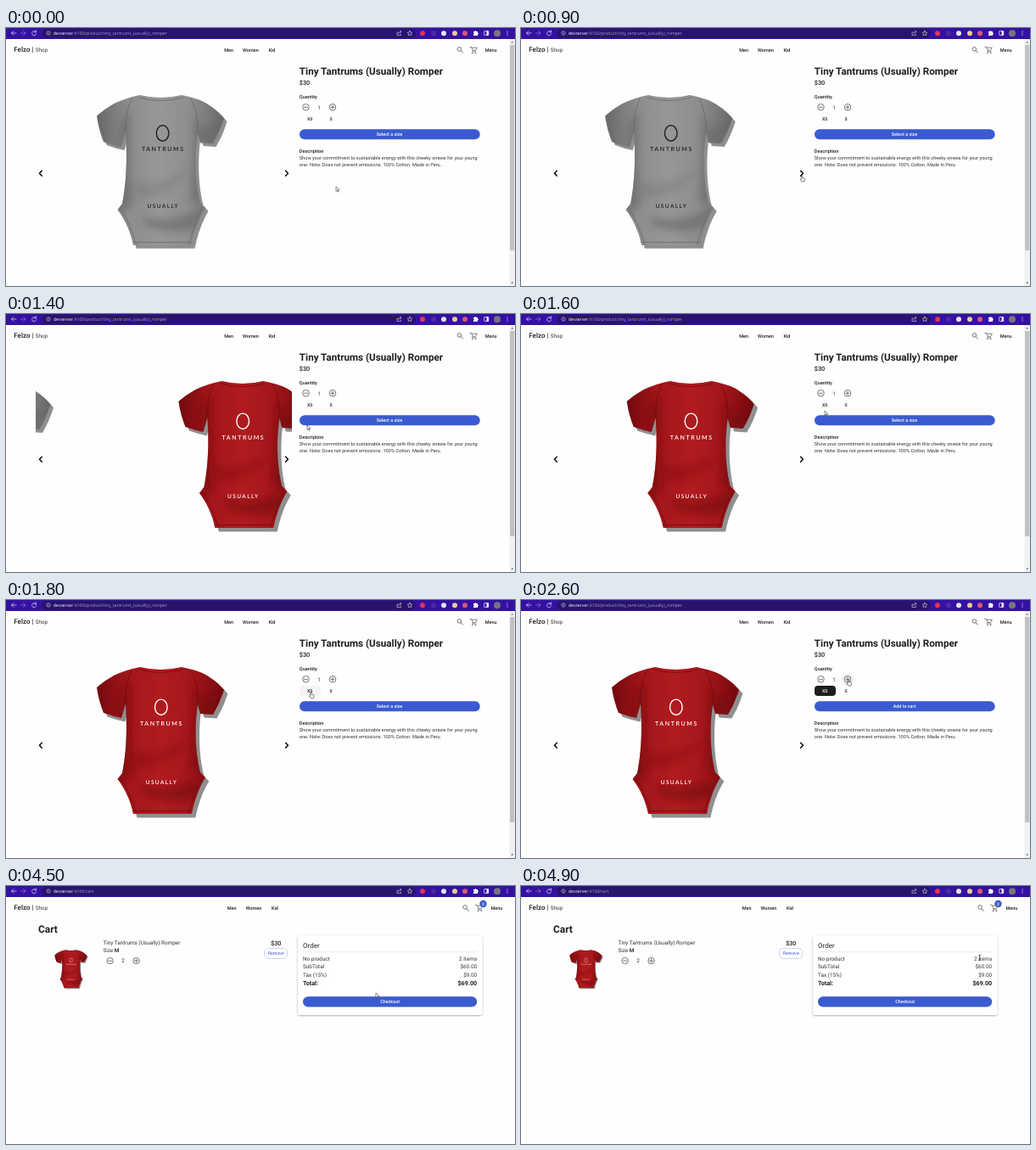
Write an HTML page that moves like this. It is 600 by 304 pixels and loops after 5 s.

```html
<!DOCTYPE html>
<html lang="en">
<head>
<meta charset="utf-8">
<title>Shop</title>
<style>
html, body { margin: 0; width: 100%; height: 100%; overflow: hidden; background: #fff; }
svg { display: block; width: 600px; height: 304px; font-family: Roboto, Arial, sans-serif; text-rendering: geometricPrecision; }
.url { font-family: "Open Sans", "Noto Sans", sans-serif; }
.print { font-family: Lato, Roboto, sans-serif; }
.line { fill: none; stroke-linecap: round; stroke-linejoin: round; }
</style>
</head>
<body>
<svg id="stage" viewBox="0 0 600 304"></svg>
<script>
const LOOP = 5000, STEP = 100;
const BLUE = '#3a5bd0', INK = '#1d1e20', GREY = '#555';
const NAME = 'Tiny Tantrums (Usually) Romper';
const HOST = 'devserver';

const text = (x, y, s, size = 5.6, o = {}) =>
  `<text x="${x}" y="${y}" font-size="${size}" font-weight="${o.w || 400}" fill="${o.fill || INK}"
    text-anchor="${o.at || 'start'}" class="${o.cls || ''}" letter-spacing="${o.ls || 0}"
    ${o.id ? `id="${o.id}"` : ''}>${s}</text>`;
const rect = (x, y, w, h, r, fill, more = '') =>
  `<rect x="${x}" y="${y}" width="${w}" height="${h}" rx="${r}" fill="${fill}" ${more}/>`;
const dot = (x, y, r, fill, more = '') =>
  `<circle cx="${x}" cy="${y}" r="${r}" fill="${fill}" ${more}/>`;
const line = (d, stroke, width = 0.7) =>
  `<path class="line" d="${d}" stroke="${stroke}" stroke-width="${width}"/>`;

// Round minus or plus button with its hover disc
const stepper = (x, y, r, plus, id) =>
  (id ? dot(x, y, 7.6, '#f1f1f1', `id="${id}"`) : '') +
  dot(x, y, r, 'none', 'stroke="#555" stroke-width=".8"') +
  line(`M${x - 2} ${y}h4` + (plus ? `M${x} ${y - 2}v4` : ''), GREY, 0.8);

const BODY = `M158 79Q182 85 207 79C222 82 234 86 240 91Q251 98 257 106Q252 122 244 135L229 134L226 123
  C222 150 223 180 229 203L235 209C227 222 222 237 219 252L150 252C147 237 140 222 131.5 211
  L137 204C142 180 143 150 141 122L136 139Q126 137 115 133Q109 118 107 103Q116 95 127 89Q142 82 158 79Z`;

function garment(id, c, o) {
  return `<linearGradient id="${id}Fill"><stop offset="0" stop-color="${c.dark}"/>
    <stop offset=".25" stop-color="${c.mid}"/><stop offset=".5" stop-color="${c.light}"/>
    <stop offset=".75" stop-color="${c.mid}"/><stop offset="1" stop-color="${c.dark}"/></linearGradient>
  <g id="${id}">
    <g transform="translate(0 ${79 * (1 - o.stretch)}) scale(1 ${o.stretch})">
      <path d="${BODY}" fill="#555" opacity=".65" transform="translate(${o.drop} ${o.drop})" filter="url(#soft)"/>
      <path d="${BODY}" fill="url(#${id}Fill)"/>
      <g clip-path="url(#bodyClip)">
        <g filter="url(#fold)" fill="${c.dark}" opacity=".6">
          <path d="M134 112L147 95L146 160L149 208L132 212Z"/>
          <path d="M230 118L221 98L221 150L217 203L232 203Z"/>
          <path d="M150 178Q178 188 218 163Q190 200 152 197Z" opacity=".45"/>
          <path d="M160 219Q198 229 234 206L225 232Q196 240 165 230Z"/>
          <path d="M232 116L252 110L243 137L228 136Z"/>
        </g>
        ${line('M157 82Q182 89 208 82M110.5 101Q112 118 118.5 132M253 104Q249 120 240.5 134', c.dark, 0.8)}
        ${line('M135 209Q147 228 153.5 251M231 209Q221 230 215.5 251M149 248.5H220', c.dark, 0.8)}
        ${line('M148 83Q140 100 141 122M218 83Q227 100 226 123', c.dark, 0.8)}
      </g>
    </g>
    <ellipse cx="${o.cx - 0.7}" cy="${o.zero}" rx="7.3" ry="9.2" fill="none" stroke="${c.print}" stroke-width="1.4"/>
    ${text(o.cx, o.top, 'TANTRUMS', 7, { w: 600, fill: c.print, at: 'middle', ls: 1.6, cls: 'print' })}
    ${text(o.cx, o.low, 'USUALLY', 6.5, { w: 600, fill: c.print, at: 'middle', ls: 1.4, cls: 'print' })}
  </g>`;
}

const grey = { dark: '#686868', mid: '#8d8d8d', light: '#979797', print: '#1f1f1f' };
const red = { dark: '#74090e', mid: '#a3161a', light: '#b01b1f', print: '#fff' };
const defs = `<defs>
  <filter id="soft" x="-10%" y="-10%" width="120%" height="120%"><feGaussianBlur stdDeviation=".7"/></filter>
  <filter id="fold" x="-20%" y="-20%" width="140%" height="140%"><feGaussianBlur stdDeviation="4"/></filter>
  <filter id="lift" x="-5%" y="-10%" width="110%" height="125%">
    <feDropShadow dx="0" dy=".8" stdDeviation="1.1" flood-color="#000" flood-opacity=".35"/></filter>
  <clipPath id="bodyClip"><path d="${BODY}"/></clipPath>
  <clipPath id="slideClip"><rect x="35" y="40" width="302" height="262"/></clipPath>
  ${garment('grey', grey, { zero: 124, top: 144.7, low: 212.2, cx: 185.3, stretch: 1.023, drop: 3.6 })}
  ${garment('red', red, { zero: 126.3, top: 148, low: 217, cx: 183.5, stretch: 1, drop: 4.4 })}
</defs>`;

const browser = () => {
  const tools = [[491, '#e0364a'], [504, '#4b2aa6'], [516, '#dfe9e0'], [529, '#e6cd90'], [541, '#d75a70']];
  return rect(0, 0, 600, 13, 0, '#3511a3') + rect(42, 0.8, 441, 11, 5.5, '#28146c') +
    line('M12 6H6.5M8.9 3.6L6.5 6L8.9 8.4', '#e8e4f2') +
    line('M17.5 6H23M20.6 3.6L23 6L20.6 8.4', '#8f80c5') +
    line('M35.2 4.6A2.6 2.6 0 1 0 35.7 6.8M35.5 2.9V4.9H33.5', '#e8e4f2') +
    dot(50, 6, 2.2, 'none', 'stroke="#cfc8e2" stroke-width=".6"') + line('M50 5.8V7.1M50 4.7v.05', '#cfc8e2', 0.6) +
    `<text class="url" x="56" y="8" font-size="5.1" fill="#aca1c9"><tspan fill="#fff">${HOST}</tspan><tspan id="path"></tspan></text>` +
    line('M462 5H461V8.5H465.5V7M462.5 6.5Q463 4.4 465.8 4.3M464.6 3L466 4.3L464.6 5.6', '#ddd6ec', 0.6) +
    line('M476 3.2l.9 1.9 2 .2-1.5 1.4.4 2-1.8-1-1.8 1 .4-2-1.5-1.4 2-.2z', '#ddd6ec', 0.6) +
    tools.map(([x, c]) => dot(x, 6.2, 3, c)).join('') +
    `<path d="M551 4H552.6Q553.4 1.8 554.3 4H556V5.6Q558 6.4 556 7.4V9H551V7.4Q552.6 6.5 551 5.6Z" fill="#fff"/>` +
    rect(563.7, 3.5, 5, 5, 0.6, 'none', 'stroke="#fff" stroke-width=".7"') + rect(566.5, 3.5, 2.2, 5, 0.3, '#fff') +
    dot(579, 6.2, 4, '#77757c') + [4, 6, 8].map(y => dot(591, y, 0.6, '#fff')).join('');
};

const header = () =>
  text(9.3, 28.4, 'Felzo', 8, { w: 500 }) + text(30.6, 28.2, '|', 8) + text(34.8, 28.2, 'Shop', 6.3, { fill: '#333' }) +
  `<g id="nav">` + [[257.3, 'Men'], [279, 'Women'], [309.5, 'Kid']].map(([x, s]) => text(x, 27.8, s, 5.5, { w: 500 })).join('') + `</g>
  <g id="tools">` +
  dot(534.4, 24.9, 2.3, 'none', 'stroke="#666" stroke-width=".9"') + line('M536.2 26.8L538.6 29.2', '#666', 1) +
  line('M546.8 22.3H548.4L550.4 26.4H553.6L555.3 23.2H548.9M550.4 26.4L549.5 28H554.3', '#666', 0.8) +
  dot(549.8, 29.4, 0.75, '#666') + dot(553.7, 29.4, 0.75, '#666') +
  text(564.8, 27.8, 'Menu', 5.5, { w: 500 }) + `</g>`;

const product = () => `<g id="product">
  <g clip-path="url(#slideClip)"><g id="track"><use href="#grey"/><use href="#red" x="301"/></g></g>` +
  line('M42.3 168.3L39.4 171.3L42.3 174.3', '#000', 1.4) + line('M329.6 168.3L332.5 171.3L329.6 174.3', '#000', 1.4) +
  text(345.8, 55.3, NAME, 11.7, { w: 600 }) + text(345.8, 67, '$30', 7.3, { w: 500 }) +
  text(345.8, 82.6, 'Quantity', 5.6, { w: 500 }) +
  stepper(353.5, 93.3, 3.8, false, 'hotMinus') + stepper(385, 93.3, 3.8, true, 'hotPlus') +
  text(369, 95.5, '1', 6.3, { at: 'middle', id: 'qty', fill: '#333' }) +
  rect(346, 101, 25, 12, 4, '#f4f4f4', 'id="chip"') +
  text(358.3, 109, 'XS', 5.2, { w: 500, at: 'middle', id: 'xs' }) + text(383, 109, 'S', 5.2, { w: 500, at: 'middle' }) +
  rect(346, 119.2, 212.7, 12, 6, BLUE, 'id="buy"') +
  text(452, 127, '', 5.4, { w: 500, at: 'middle', fill: '#fff', id: 'buyText' }) +
  text(345.8, 146.8, 'Description', 5.6, { w: 500 }) +
  text(345.8, 154.9, 'Show your commitment to sustainable energy with this cheeky onesie for your young', 5.6, { fill: '#333' }) +
  text(345.8, 162.6, 'one. Note: Does not prevent emissions. 100% Cotton. Made in Peru.', 5.6, { fill: '#333' }) +
  rect(593.3, 13, 6.7, 291, 0, '#f1f1f1') + rect(594.1, 20, 5.2, 242, 0, '#c1c1c1') +
  `<path d="M595.2 17.6h3l-1.5-1.8zM595.2 299.6h3l-1.5 1.8z" fill="#666"/></g>`;

const cart = () => {
  const rows = [[88, 'No product', '2 items'], [97.3, 'SubTotal', '$60.00'], [106.5, 'Tax (15%)', '$9.00']];
  return `<g id="cart">` + text(38, 55.3, 'Cart', 11.9, { w: 600 }) +
    `<use href="#red" transform="translate(30 54.6) scale(.255 .26)"/>` +
    text(114.4, 68.5, NAME, 6.4, { fill: '#333' }) +
    text(114.4, 78, 'Size <tspan font-weight="700">M</tspan>', 6.4, { fill: '#333' }) +
    stepper(122.6, 88.1, 3.7, false) + stepper(153.6, 88.1, 3.7, true) +
    text(138, 90.4, '2', 6.4, { at: 'middle', fill: '#333' }) +
    text(318.3, 70, '$30', 7.2, { w: 500, at: 'middle' }) +
    rect(304.5, 73.6, 27.3, 11.8, 4.5, '#fff', 'stroke="#b4c0e8" stroke-width=".7"') +
    text(318.2, 81.3, 'Remove', 5.3, { at: 'middle', fill: BLUE }) +
    rect(344, 58.5, 217.5, 93.5, 3, '#fff', 'filter="url(#lift)"') +
    text(350, 72.8, 'Order', 8, { fill: '#222' }) + rect(350, 77.6, 205.3, 0.5, 0, '#d5d5d5') +
    rows.map(([y, a, b]) => text(350, y, a, 6.4, { fill: '#333' }) + text(555.2, y, b, 6.4, { at: 'end', fill: '#333' })).join('') +
    text(350, 117.4, 'Total:', 7.2, { w: 600 }) + text(555.2, 117.4, '$69.00', 7.2, { w: 600, at: 'end' }) +
    rect(350, 130.2, 205.2, 12.4, 6.2, BLUE) +
    text(452.6, 138.2, 'Checkout', 5.4, { w: 500, at: 'middle', fill: '#fff' }) +
    dot(562.5, 21, 4.2, BLUE) + text(562.5, 22.8, '2', 4.9, { w: 500, at: 'middle', fill: '#fff' }) + `</g>`;
};

const pointers = `<g id="pointer">
  <path id="arrow" d="M0 0V5.4L1.3 4.2L2.2 6.2L3.1 5.8L2.2 3.9H4Z" fill="#fff" stroke="#222" stroke-width=".55"/>
  <path id="hand" d="M-.7 .2Q0-.5 .6 .2V2.6L3 3.1Q3.6 3.3 3.5 4L2.9 7H-.2L-2 4.6Q-1.8 3.7-.7 4.4Z" fill="#fff" stroke="#222" stroke-width=".55"/>
  <path id="beam" class="line" d="M-1-3.2H1M0-3.2V3M-1 3H1" stroke="#222" stroke-width=".6"/>
</g>`;

document.getElementById('stage').innerHTML =
  defs + rect(0, 0, 600, 304, 0, '#fefefe') + product() + cart() + header() + browser() + pointers;

const $ = id => document.getElementById(id);
const show = (id, on) => $(id).setAttribute('display', on ? 'inline' : 'none');
const attr = (id, key, value) => $(id).setAttribute(key, value);
const label = (id, s) => { if ($(id).textContent !== s) $(id).textContent = s; };

// time, x, y, shape
const moves = [
  [0, 389, 187, 'arrow'], [200, 382, 186, 'arrow'], [600, 331, 174, 'hand'], [1100, 331, 174, 'hand'],
  [1200, 337, 163, 'arrow'], [1400, 355, 131, 'arrow'], [1600, 358, 114, 'arrow'], [1700, 359.5, 109, 'hand'],
  [2200, 359.5, 108, 'hand'], [2500, 386, 94, 'hand'], [3400, 386.5, 94, 'hand'], [3500, 374, 95, 'arrow'],
  [3600, 356, 94, 'hand'], [4000, 356.5, 94, 'hand'], [4100, 385, 108, 'arrow'], [4200, 430, 125, 'hand'],
  [4500, 436, 126, 'arrow'], [4700, 510, 100, 'arrow'], [4800, 541, 84.5, 'beam'], [5000, 540, 84.7, 'beam']
];
const counts = [[0, 1], [2800, 2], [3100, 3], [3400, 4], [3800, 3], [4000, 2]];
const SLIDE = [880, 765], PICK = 2100, OPEN_CART = 4500;

const last = (list, t) => list.findLastIndex(k => k[0] <= t);
function cursorAt(t) {
  const i = last(moves, t), a = moves[i], b = moves[i + 1];
  const k = (t - a[0]) / (b[0] - a[0]);
  return { x: a[1] + (b[1] - a[1]) * k, y: a[2] + (b[2] - a[2]) * k, shape: a[3] };
}

function draw(t) {
  const inCart = t >= OPEN_CART, picked = t >= PICK, c = cursorAt(t);
  const near = x => Math.hypot(c.x - x, c.y - 93.3) < 7;
  const slide = Math.min(1, Math.max(0, (t - SLIDE[0]) / SLIDE[1]));
  show('product', !inCart);
  show('cart', inCart);
  attr('nav', 'transform', `translate(${inCart ? 3.5 : 0})`);
  attr('tools', 'transform', `translate(${inCart ? 6.7 : 0})`);
  label('path', inCart ? ':4100/cart' : ':4100/product/tiny_tantrums_(usually)_romper');
  attr('track', 'transform', `translate(${-301 * slide})`);

  const overChip = c.x > 346 && c.x < 371 && c.y > 101 && c.y < 113;
  show('chip', picked || overChip);
  attr('chip', 'fill', picked ? '#1c1d1f' : '#f4f4f4');
  attr('xs', 'fill', picked ? '#fff' : INK);
  label('buyText', picked ? 'Add to cart' : 'Select a size');
  attr('buy', 'fill', picked && c.y > 119 && c.y < 131 ? '#3150bb' : BLUE);
  label('qty', String(counts[last(counts, t)][1]));
  show('hotMinus', near(353.5));
  show('hotPlus', near(385));

  attr('pointer', 'transform', `translate(${c.x} ${c.y})`);
  for (const s of ['arrow', 'hand', 'beam']) show(s, s === c.shape);
}

const start = performance.now();
function tick(now) {
  const t = Math.max(0, now - start) % LOOP;
  draw(Math.floor(t / STEP) * STEP);
  requestAnimationFrame(tick);
}
draw(0);
requestAnimationFrame(tick);
</script>
</body>
</html>
```
